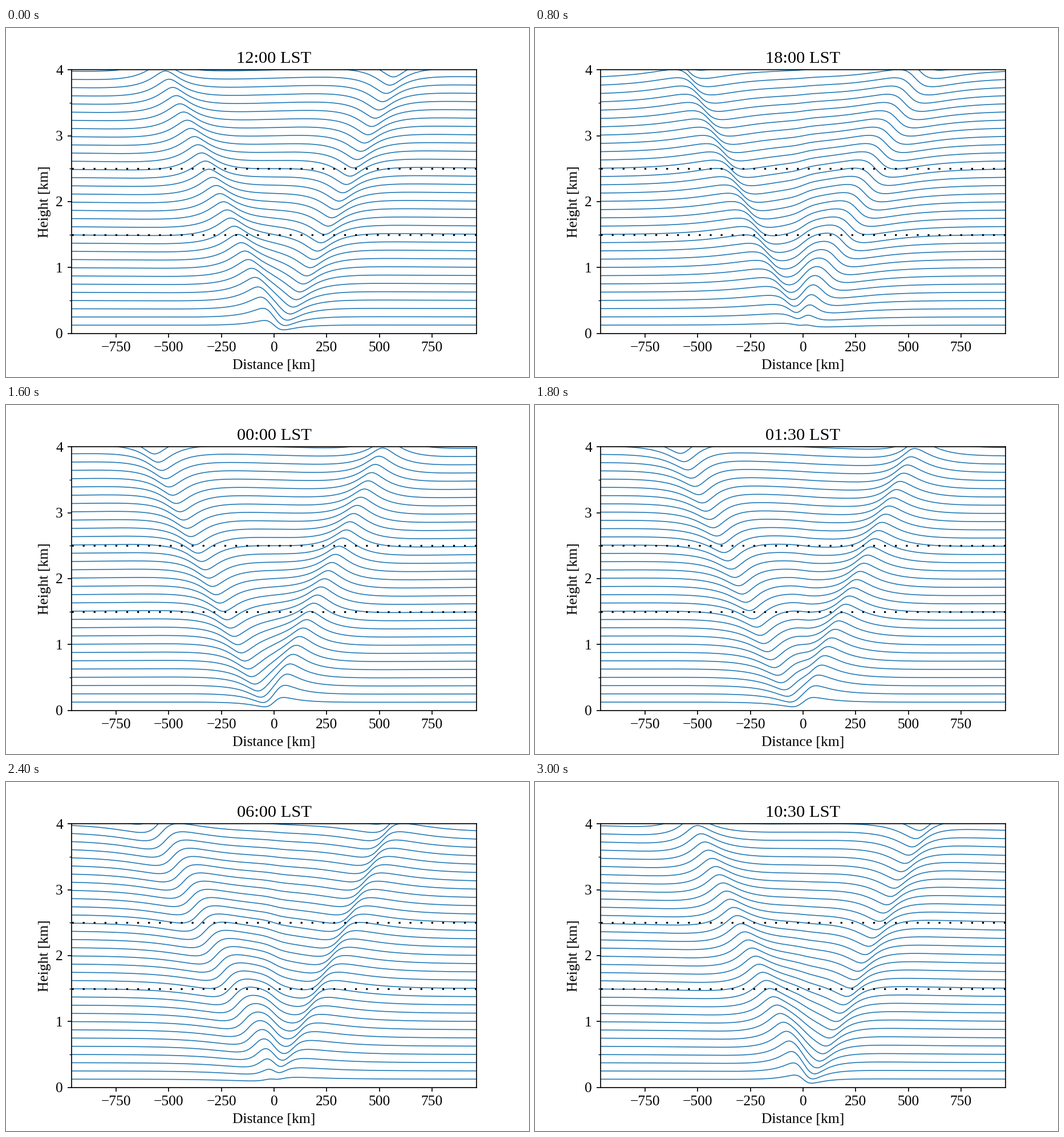
Write a matplotlib script that moves like this. It is 917 by 611 pixels and loops after 3.2 s.

```python
import numpy as np
import matplotlib.pyplot as plt
from matplotlib.animation import FuncAnimation
from matplotlib.ticker import MultipleLocator

# Linear sea-breeze response to diurnal heating at the equator
N = 0.01                    # buoyancy frequency [1/s]
OMEGA = 2 * np.pi / 86400   # diurnal frequency [1/s]
Q0 = 1.2e-5                 # heating amplitude [m/s^3]
DEPTH = 1.0                 # heating depth [km]
COAST = 50.0                # coastal transition half-width [km]

FRAMES, INTERVAL = 16, 200
DPI = 152.8

slope = N / OMEGA
amp = Q0 / (np.pi * N**2 * OMEGA) / 1000   # [km]
x_max = 7 * slope

x = np.linspace(-x_max, x_max, 1001)
levels = np.arange(1, 39) * 0.125
xs = x / slope
z = levels[:, None]


def spectral_table(s_max=12.5, count=1601):
    """G(s) = integral of m exp(-m a + i m s) / (1/h^2 + m^2) dm on a grid of s >= 0."""
    dm = 0.01
    m = np.arange(1, 4500) * dm
    weight = m * np.exp(-m * COAST / slope) / (DEPTH**-2 + m**2) * dm
    s = np.linspace(0, s_max, count)
    phase = np.outer(s, m)
    return s, np.cos(phase) @ weight, np.sin(phase) @ weight


S, G_RE, G_IM = spectral_table()


def kernel(s):
    r = np.abs(s)
    return np.interp(r, S, G_RE) + 1j * np.sign(s) * np.interp(r, S, G_IM)


forced = np.exp(-z / DEPTH) * kernel(xs).imag
beams = (kernel(z + xs) - kernel(z - xs)) / 2


def displacement(tau):
    return amp * (forced * np.sin(tau) + (beams * np.exp(1j * tau)).real)


plt.rcParams.update({
    "font.family": "Liberation Serif",
    "font.size": 12,
    "axes.unicode_minus": True,
})

fig, ax = plt.subplots(figsize=(917 / DPI, 611 / DPI), dpi=DPI)
fig.subplots_adjust(left=0.125, right=0.9, bottom=0.125, top=0.88)

lines = [ax.plot(x, np.full_like(x, h), color="C0", lw=0.75)[0] for h in levels]
for h in (1.5, 2.5):
    ax.plot([-x_max, x_max], [h, h], color="k", lw=1.5, ls=(0, (1, 5)))

ax.set_xlim(-x_max, x_max)
ax.set_ylim(0, 4)
ax.xaxis.set_major_locator(MultipleLocator(250))
ax.yaxis.set_major_locator(MultipleLocator(1))
ax.yaxis.set_minor_locator(MultipleLocator(0.5))
ax.yaxis.set_major_formatter("{x:.0f}")
ax.set_xlabel("Distance [km]")
ax.set_ylabel("Height [km]")
title = ax.set_title("12:00 LST")


def update(i):
    heights = z + displacement(2 * np.pi * i / FRAMES)
    for line, y in zip(lines, heights):
        line.set_ydata(y)
    minutes = (720 + 90 * i) % 1440
    title.set_text(f"{minutes // 60:02d}:{minutes % 60:02d} LST")
    return [*lines, title]


anim = FuncAnimation(fig, update, frames=FRAMES, interval=INTERVAL,
                     repeat=True, repeat_delay=0, blit=False)
plt.show()
```
